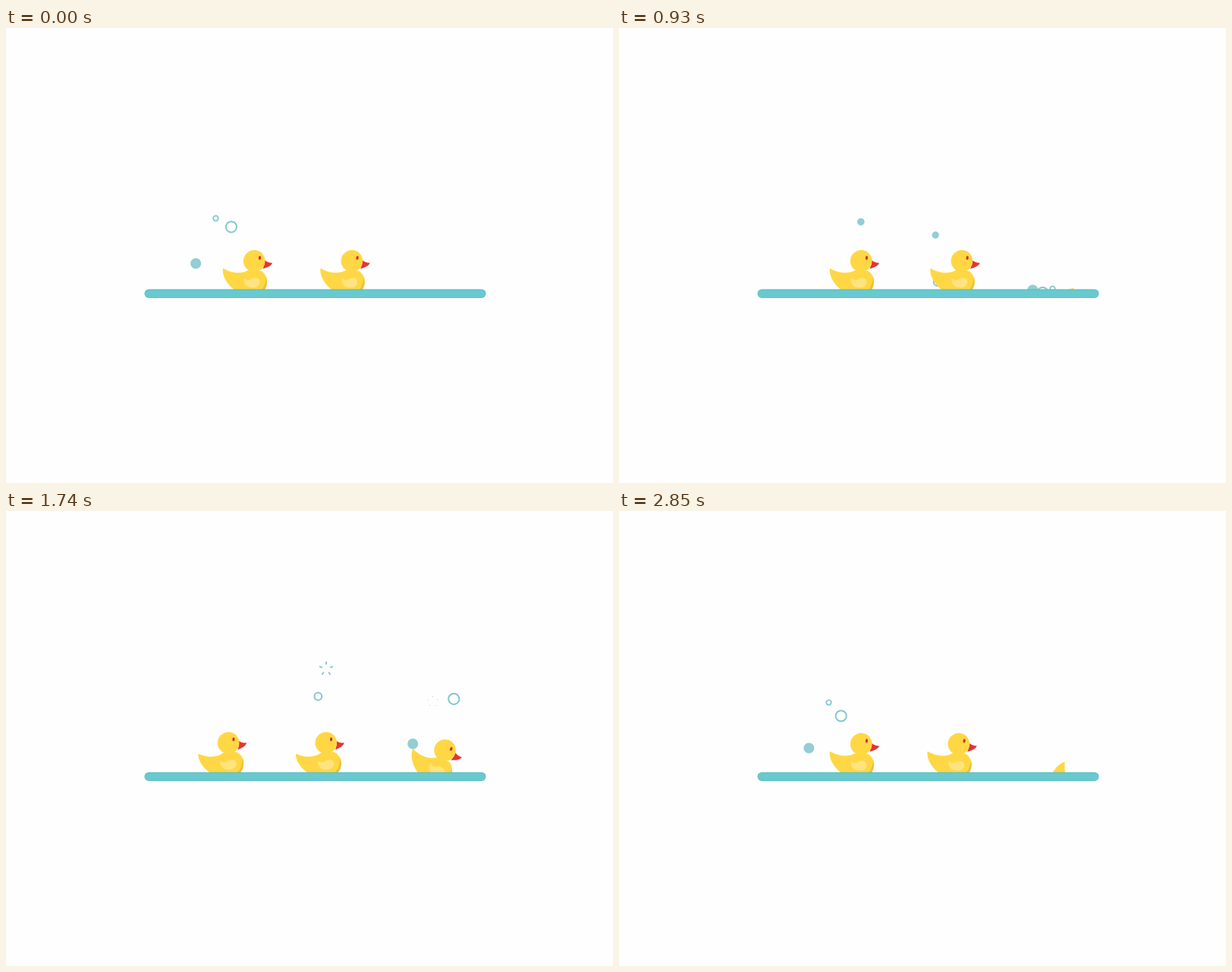
These frames come from a looping animation (800 by 600 pixels, 2.88 s). An HTML page with a canvas:

```html
<!DOCTYPE html>
<html lang="en">
<head>
<meta charset="utf-8">
<title>Rubber ducks</title>
<style>
  html, body { margin: 0; width: 100%; height: 100%; overflow: hidden; background: #fefefe; }
  canvas { display: block; width: 800px; height: 600px; }
</style>
</head>
<body>
<canvas id="stage"></canvas>
<script>
const LOOP = 2880, STEP = 30, CYCLE = 2910, WATER = 345;
const DUCKS = 3, DUCK_GAP = 960, SPEED = 0.134, SURFACED = 600, DIVE = 2640;
const POP = 130;

const canvas = document.getElementById('stage');
const ctx = canvas.getContext('2d');
const ratio = window.devicePixelRatio || 1;
canvas.width = 800 * ratio;
canvas.height = 600 * ratio;

const clamp = u => Math.min(1, Math.max(0, u));
const ease = u => (1 - Math.cos(Math.PI * clamp(u))) / 2;
const easeFrom = (t, a, b) => ease((t - a) / (b - a));
const ageAt = (t, born) => t < born ? t - born + CYCLE : t - born;

function fill(path, color) {
  ctx.fillStyle = color;
  ctx.fill(path);
}

function oval(x, y, rx, ry = rx) {
  const path = new Path2D();
  path.ellipse(x, y, rx, ry, 0, 0, Math.PI * 2);
  return path;
}

// Duck parts, drawn around the point the duck rocks on
const body = new Path2D('M-33-19.3C-22-14.5-8-15-.5-21.5L17-23.5C24-20 27-14 27-9C27-2 24 4 19 7L-14 7C-26 0-32-9-33.3-17Q-33.5-19.6-33-19.3Z');
const shade = new Path2D('M24.6-16C28.5-8 27.5 2 19 7L15 7C23 2 25.5-7 24.6-16Z');
const wing = new Path2D('M-4-11Q0-8 4-9.7Q9-14.5 15-12.3C20-8 17 0 8 .3C0 .5-4-4-4-11Z');
const beak = new Path2D('M19.7-38Q24-35 30-36Q29-30.5 18.6-26.5Q20.8-32 19.7-38Z');
const head = oval(6, -35, 14.3);
const eye = oval(12.6, -40, 1.6, 2.6);

// A duck surfaces looking up, rocks along the water and dives nose first
function duckPose(t, age) {
  const rock = (1 + Math.cos(2 * Math.PI * (t + 15) / 480)) / 2;
  const under = Math.max(0, 1 - age / SURFACED) ** 2;
  const dive = Math.max(0, age - DIVE) / 210;
  return {
    x: 180.9 + SPEED * age + 32 * under + 12 * easeFrom(age, 2580, 2760) + 2.6 * rock,
    y: 340.5 + 53 * under + 27 * dive ** 2.2 + 0.4 * rock,
    turn: -55 + 65 * easeFrom(age, 120, 540) - 10 * easeFrom(age, 540, 690)
      + 67 * dive ** 1.27 + 8.5 * rock
  };
}

function drawDuck(t, born) {
  const { x, y, turn } = duckPose(t, ageAt(t, born));
  // The turn settles at zero once the duck is afloat
  ctx.save();
  ctx.translate(x, y);
  ctx.rotate((turn + 0) * Math.PI / 180);
  fill(body, '#ffd744');
  fill(shade, '#f0c035');
  fill(wing, '#ffe37e');
  fill(beak, '#e23536');
  fill(head, '#ffd744');
  fill(eye, '#cf3030');
  ctx.restore();
}

// A bubble rises with an eased lift, drifts and sways sideways, then pops
function bubble(born, life, r, x, dx, y, dy, lift, sway = 0, waves = 1) {
  return { born, life, r, x, dx, y, dy, lift, sway, waves };
}

const solid = b => ({ ...b, solid: true });

function bigCluster(born, x) {
  return [
    solid(bubble(born, 1265, 7, x, -10, 350, -47, 0.68, -6)),
    bubble(born, 1440, 7.1, x + 14, 29, 354, -136, 0.85, -12, 2),
    bubble(born, 815, 3.3, x + 27, -12.5, 349, -98, 1, -4)
  ];
}

const QUICK = 0.53;
const bubbles = [
  ...bigCluster(2100, 262),
  ...bigCluster(810, 548),
  solid(bubble(180, 880, 4.8, 312, 8, 352, -98, QUICK)),
  bubble(640, 520, 2.2, 307, 12, 350, -44, QUICK),
  solid(bubble(600, 1090, 4.7, 415, 7, 352, -144, QUICK)),
  bubble(850, 1030, 4.9, 420, -11, 352, -109, QUICK, 2),
  bubble(850, 540, 2.2, 423, 2, 352, -75, QUICK)
];

function drawBurst(x, y, r, p) {
  const outer = r * (2.12 - 0.7 * (1 - p) ** 4);
  const inner = outer - r * 1.25 * (1 - p) - 0.4;
  ctx.lineWidth = r > 4 ? 2 - p * p : 0.9;
  ctx.beginPath();
  for (let i = 0; i < 5; i++) {
    const a = (i * 72 - 90) * Math.PI / 180, c = Math.cos(a), s = Math.sin(a);
    ctx.moveTo(x + c * inner, y + s * inner);
    ctx.lineTo(x + c * outer, y + s * outer);
  }
  ctx.stroke();
}

function drawBubble(b, t) {
  const age = ageAt(t, b.born), p = (age - b.life) / POP;
  if (p > 1) return;
  const u = clamp(age / b.life);
  const x = b.x + b.dx * u + b.sway * Math.sin(Math.PI * b.waves * u);
  const y = b.y + b.dy * ease(u ** b.lift);
  ctx.strokeStyle = '#83c8cc';
  if (p >= 0) return drawBurst(x, y, b.r, p);
  const shape = oval(x, y, b.r);
  if (b.solid) return fill(shape, '#92ced3');
  ctx.lineWidth = b.r > 4 ? 2 : 1.7;
  ctx.stroke(shape);
}

function bar(x, y, w, h, color) {
  const path = new Path2D();
  path.roundRect(x, y, w, h, h / 2);
  fill(path, color);
}

function draw(t) {
  ctx.setTransform(ratio, 0, 0, ratio, 0, 0);
  ctx.fillStyle = '#fefefe';
  ctx.fillRect(0, 0, 800, 600);
  ctx.save();
  ctx.beginPath();
  ctx.rect(0, 0, 800, WATER);
  ctx.clip();
  bubbles.forEach(b => drawBubble(b, t));
  for (let i = 0; i < DUCKS; i++) drawDuck(t, i * DUCK_GAP);
  ctx.restore();
  bar(182.5, 344.5, 450, 11.5, '#57b9bf');
  bar(183, 345.5, 449, 9.8, '#68c9cf');
}

const start = performance.now();
function frame() {
  const t = (performance.now() - start) % LOOP;
  draw(Math.floor(t / STEP) * STEP);
  requestAnimationFrame(frame);
}
frame();
</script>
</body>
</html>
```
